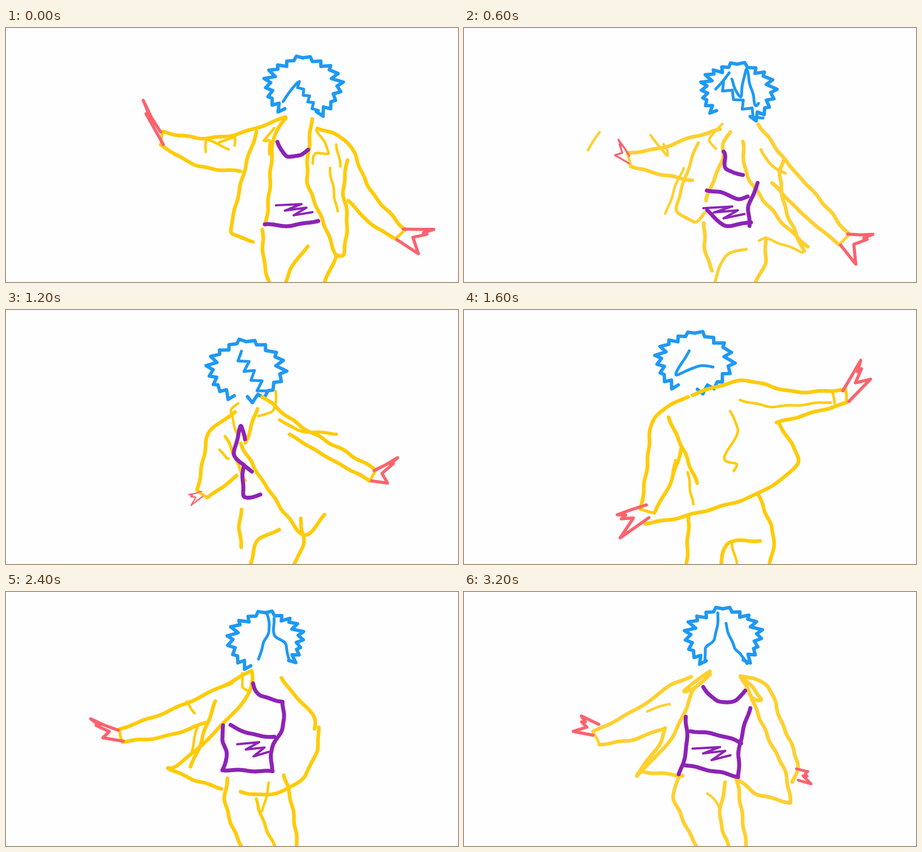
Recreate the animation shown at these times as an HTML page with a canvas. Size 800x450 px, loop 3.3 s.

```html
<!DOCTYPE html>
<html lang="en">
<head>
<meta charset="utf-8">
<title>Dancing line figure</title>
<style>
html, body { margin: 0; width: 100%; height: 100%; overflow: hidden; background: #fefdff; }
canvas { display: block; width: 100%; height: 100%; }
</style>
</head>
<body>
<canvas id="stage" width="800" height="450"></canvas>
<script>
const ctx = document.getElementById('stage').getContext('2d');
const STEP = 100, STEPS = 33, SAMPLES = 60, SPIKES = 9;
const BLUE = '#1e99f4', PURPLE = '#8d23b6', RED = '#fb636d', GOLD = '#fecb07', SOFT = '#fed02f';
const poses = [];

const mix = (a, b, t) => a + (b - a) * t;
const lerp = (p, q, t) => [mix(p[0], q[0], t), mix(p[1], q[1], t)];
const shift = (p, d, k) => [p[0] + d[0] * k, p[1] + d[1] * k];
const unit = ([x, y]) => { const d = Math.hypot(x, y) || 1; return [x / d, y / d]; };
const sub = (p, q) => [p[0] - q[0], p[1] - q[1]];
const pairs = n => n.flatMap((x, i) => i % 2 ? [] : [[x, n[i + 1]]]);

// Smooth curve through a few key points, always with the same number of samples.
function spline(keys) {
  const out = [], last = keys.length - 1;
  for (let s = 0; s <= SAMPLES; s++) {
    const i = Math.min(last - 1, Math.floor(s / SAMPLES * last)), u = s / SAMPLES * last - i;
    const b = keys[i], c = keys[i + 1], a = keys[i - 1] || b, d = keys[i + 2] || c;
    out.push([0, 1].map(k => {
      const m = (c[k] - a[k]) * 0.4, n = (d[k] - b[k]) * 0.4;
      return b[k] + u * (m + u * (3 * (c[k] - b[k]) - 2 * m - n + u * (2 * (b[k] - c[k]) + m + n)));
    }));
  }
  return out;
}

// A pose collects named strokes; strokes of the same name morph into each other.
const add = (name, ink, w, pts) => poses[poses.length - 1].strokes.set(name, { ink, w, pts });
const pen = (ink, w) => (name, ...n) => add(name, ink, w, spline(pairs(n)));
const coat = pen('', 6.5), thin = pen('', 4.5);
const shirt = pen(PURPLE, 7), lock = pen(BLUE, 5);

// Two spiky arcs run from the crown down to the given angles.
function pose(at, x, y, left, right, gold = GOLD) {
  poses.push({ at, x, y, gold, strokes: new Map() });
  const point = (deg, r) => {
    const a = deg * Math.PI / 180;
    return [x + 66 * r * Math.sin(a), y - 54 * r * Math.cos(a)];
  };
  for (const end of [left, right]) {
    const pts = [point(0, 0.95)];
    for (let i = 0; i < SPIKES; i++)
      pts.push(point(end * (i + 0.65) / SPIKES, 1.03 + 0.05 * Math.sin(i * 5)),
        point(end * (i + 0.95) / SPIKES, 0.86 + 0.04 * Math.cos(i * 3)));
    add(end < 0 ? 'hairL' : 'hairR', BLUE, 6, pts);
  }
}

function fringe(x0, y0, x1, y1, amp) {
  const n = unit([y0 - y1, x1 - x0]), pts = [];
  for (let i = 0; i <= 8; i++)
    pts.push(shift(lerp([x0, y0], [x1, y1], i / 8), n, i % 2 ? amp : -amp));
  add('fringe', BLUE, 5, pts);
}

function scribble(x, y, w, h) {
  const pts = [];
  for (let i = 0; i < 6; i++)
    pts.push(i % 2 ? [x + w * (0.62 + 0.075 * i), y + h * (0.225 * i - 0.4)]
      : [x + w * 0.125 * i, y + h * 0.275 * i]);
  add('scribble', PURPLE, 4, pts);
}

// Sleeve from neck over the shoulder to the cuff and back to the armpit; bows bend each edge.
function arm(side, nx, ny, sx, sy, ax, ay, wx, wy, bowTop, bowLow) {
  const shoulder = [sx, sy], pit = [ax, ay], wrist = [wx, wy];
  const axis = unit(sub(wrist, lerp(shoulder, pit, 0.5)));
  let across = [axis[1], -axis[0]];
  if (across[0] * (sx - ax) + across[1] * (sy - ay) < 0) across = [-across[0], -across[1]];
  const edge = (from, to, bow) => {
    const d = unit(sub(to, from));
    return [from, shift(lerp(from, to, 0.5), [-d[1], d[0]], bow), to];
  };
  const a = shift(wrist, across, 12), b = shift(wrist, across, -12);
  add(side + 'Top', '', 6.5, spline([...edge(a, shoulder, bowTop), [nx, ny]]));
  add(side + 'Low', '', 6.5, spline(edge(b, pit, bowLow)));
  add(side + 'Cuff', '', 5, spline([a, b]));
}

// Open outline of a hand: wrist, two fingers, palm, thumb, wrist.
function hand(side, wx, wy, fx, fy, tx, ty) {
  const wrist = [wx, wy], finger = [fx, fy], thumb = [tx, ty];
  const s = unit(sub(finger, thumb));
  add(side + 'Hand', RED, Math.min(5.5, Math.hypot(fx - wx, fy - wy) / 4), [
    shift(wrist, s, 11), shift(lerp(wrist, finger, 0.5), s, 5), finger,
    shift(lerp(wrist, finger, 0.72), s, -3), shift(lerp(wrist, finger, 0.88), s, -8),
    lerp(wrist, lerp(finger, thumb, 0.5), 0.5), thumb, shift(wrist, s, -11)
  ]);
}

pose(0, 526, 105, -146, 157);
arm('l', 496,158, 410,188, 414,254, 276,196, 9, 14);
arm('r', 552,177, 606,204, 606,305, 697,365, -13, -7);
coat('bodyL', 444,183, 425,240, 404,325, 399,362, 436,378);
coat('lapelL', 496,160, 474,195, 466,290, 460,349);
thin('collarL', 475,178, 456,199, 467,201, 466,225);
coat('lapelR', 541,162, 533,268, 556,330, 584,402);
thin('collarR', 550,180, 572,222, 548,222, 543,240);
coat('bodyR', 604,235, 597,290, 604,335, 598,400, 584,402);
thin('fold', 573,247, 586,325);
thin('fold2', 585,206, 592,245);
thin('sleeve', 354,196, 354,220);
thin('sleeve2', 358,198, 393,214);
thin('bump', 378,203, 405,193, 404,208);
coat('legL', 454,357, 456,410, 466,452);
coat('legR', 585,402, 563,452);
coat('inner', 533,386, 505,425, 494,452);
shirt('neck', 481,202, 496,227, 520,226, 534,215);
shirt('hem', 459,348, 505,350, 552,341);
scribble(477, 315, 66, 15);
lock('bangs', 490,131, 516,97);
fringe(516, 97, 550, 148, 4);
hand('l', 276,196, 243,129, 248,152);
hand('r', 697,365, 757,357, 729,399);

pose(4, 515, 115, -115, 143, SOFT);
arm('l', 480,166, 418,168, 390,231, 244,187, 10, 4);
arm('r', 541,180, 600,228, 597,298, 701,360, -3, -5);
coat('bodyL', 418,172, 384,250, 348,352, 396,379, 420,345);
coat('lapelL', 480,182, 465,205, 465,240, 430,320, 425,345);
thin('collarL', 479,167, 449,201, 462,200);
thin('crease', 419,247, 405,280, 388,328);
coat('lapelR', 537,172, 528,235, 578,300, 628,395);
coat('bodyR', 596,233, 590,262, 600,320, 632,393);
thin('hemR', 552,376, 570,373, 629,396);
thin('fold', 557,213, 566,235, 590,256);
thin('cuffL', 271,184, 250,215);
thin('sleeve', 336,188, 323,218);
thin('sleeve2', 360,188, 387,222);
coat('legL', 422,345, 428,415, 444,452);
coat('legR', 541,355, 549,405, 537,452);
thin('inner', 530,402, 485,404, 460,452);
shirt('neck', 475,204, 486,236, 508,241, 522,234);
shirt('sideR', 551,274, 535,315, 536,349);
shirt('hem', 427,347, 480,355, 536,349);
shirt('bust', 460,286, 485,290, 515,301, 532,298);
scribble(454, 317, 74, 17);
lock('bangs', 504,90, 520,120, 530,72, 546,134, 553,133);
lock('lock', 500,78, 476,106);
fringe(474, 107, 560, 166, 5);
hand('l', 244,187, 212,127, 204,174);
hand('r', 701,360, 751,348, 730,398);

pose(9, 438, 118, -165, 180);
arm('l', 411,201, 380,232, 427,328, 364,302, -2, 0);
arm('r', 491,155, 537,263, 466,237, 630,398, 10, -3);
thin('sleeve', 380,232, 405,246, 414,237);
thin('collarL', 425,176, 411,190, 423,235);
thin('bodyL', 408,248, 431,300);
coat('lapelL', 457,185, 443,228, 436,245);
coat('lapelR', 428,247, 465,310, 538,408, 577,374);
thin('collarR', 460,198, 486,190, 491,155);
coat('fold', 480,220, 500,245, 537,261);
coat('legL', 430,345, 426,370, 434,395);
coat('legR', 521,400, 510,428, 484,452);
coat('inner', 452,374, 430,405, 416,452);
shirt('neck', 435,239, 429,217, 417,265, 433,285, 449,298);
shirt('hem', 433,285, 434,341, 464,337);
fringe(424, 88, 470, 158, 8);
hand('l', 364,302, 364,302, 364,302);
hand('r', 630,398, 685,392, 640,447);

pose(16, 408, 93, -150, 175);
arm('l', 397,153, 336,191, 385,245, 325,356, 0, 6);
arm('r', 405,150, 495,125, 552,200, 676,153, -12, 0);
coat('bodyL', 362,191, 383,236, 413,307);
thin('sleeve', 373,266, 369,300);
thin('crease', 396,287, 405,345);
thin('seam', 470,180, 485,212, 461,262, 482,274, 478,286);
thin('cuffR', 653,145, 655,165);
thin('fold', 489,159, 545,171, 648,163);
coat('bodyR', 556,200, 591,270, 515,328, 385,367, 320,378);
coat('legL', 398,366, 394,452);
coat('legR', 521,327, 548,400, 541,452);
coat('inner', 525,409, 468,412, 454,452);
thin('inner2', 474,414, 483,452);
lock('bangs', 398,73, 376,115, 418,98, 440,102);
hand('l', 325,356, 272,362, 277,404);
hand('r', 676,153, 702,90, 720,122);

pose(20, 447, 93, -157, 115);
arm('l', 425,146, 357,206, 349,271, 226,333, 0, 2);
thin('sleeve', 318,228, 292,256);
coat('bodyL', 357,205, 363,320);
thin('crease', 347,268, 325,335);
coat('collarR', 431,174, 446,206, 474,203, 487,167);
thin('hatch', 440,150, 424,170, 437,158, 436,175);
coat('rTop', 487,167, 520,200, 565,255, 596,298);
coat('bodyR', 596,298, 575,293, 505,323, 345,350, 311,346);
coat('legL', 395,343, 397,395, 412,452);
coat('legR', 509,326, 541,452);
thin('inner', 422,360, 440,398, 472,452);
lock('bangs', 458,40, 471,70, 467,85, 455,102);
lock('lock', 474,58, 498,100);
hand('l', 226,333, 165,330, 205,363);
hand('r', 466,160, 436,108, 493,141);

pose(27, 470, 86, -152, 150);
arm('l', 435,139, 365,155, 360,201, 186,195, 6, 12);
thin('sleeve', 320,168, 367,184);
thin('sleeve2', 380,169, 410,158);
coat('bodyL', 382,184, 340,250, 300,302);
thin('crease', 334,214, 328,255);
coat('lapelL', 445,137, 442,172, 405,220, 320,300, 297,308);
thin('collarL', 428,142, 428,165, 440,172);
coat('hemL', 297,308, 330,325, 390,345);
coat('rTop', 490,140, 492,157, 530,193, 507,202);
coat('bodyR', 520,196, 540,275, 553,362, 495,359);
coat('legL', 390,320, 381,360, 395,402, 421,452);
coat('legR', 480,322, 493,375, 497,452);
thin('crotch', 476,335, 464,385);
coat('inner', 457,373, 478,452);
shirt('neck', 447,158, 460,181, 500,191);
shirt('sideR', 500,191, 500,240, 481,270, 480,315);
shirt('sideL', 395,234, 392,260, 401,280, 394,310);
shirt('hem', 393,312, 481,315);
shirt('bust', 408,233, 440,248, 485,254);
scribble(420, 266, 55, 20);
lock('bangs', 466,40, 462,72, 446,95, 442,131);
lock('lock', 473,38, 473,82, 498,98, 503,138);
hand('l', 186,195, 139,147, 146,180);

pose(32, 459, 82, -150, 144, SOFT);
arm('l', 402,150, 366,165, 354,242, 234,259, 5, 6);
thin('sleeve', 325,211, 365,198);
coat('bodyL', 357,240, 345,270, 305,326);
coat('lapelL', 407,172, 370,255, 305,327);
coat('collarL', 435,140, 390,174, 407,172, 435,145);
coat('hemL', 318,319, 388,325);
coat('collarR', 490,148, 510,187, 526,188, 490,148);
coat('rTop', 492,148, 538,167, 560,225, 590,300, 582,336);
coat('bodyR', 510,190, 537,255, 568,318, 578,372);
coat('hemR', 482,328, 515,356, 578,374);
coat('legL', 382,325, 371,365, 412,452);
coat('legR', 483,330, 500,452);
coat('inner', 463,337, 453,398, 468,452);
thin('crotch', 431,357, 452,380, 453,397);
shirt('neck', 424,168, 448,194, 480,192, 497,175);
shirt('sideR', 506,206, 488,270, 486,327);
shirt('sideL', 393,222, 394,275, 381,322);
shirt('hem', 390,306, 486,327);
shirt('bust', 400,246, 455,254, 490,268);
scribble(405, 277, 68, 18);
lock('bangs', 450,38, 444,84, 427,100, 427,125);
lock('lock', 463,55, 478,98, 490,110, 500,126);
hand('l', 234,245, 208,219, 193,247);
hand('r', 590,323, 609,319, 614,340);

// Every step is redrawn by a slightly unsteady hand.
const wobble = ([x, y], seed) =>
  [x + Math.sin(y / 7 + x / 19 + seed), y + Math.sin(x / 8 + y / 23 + seed * 2)];

function trace(pts, w, color, seed) {
  if (w < 0.5) return;
  ctx.strokeStyle = color;
  ctx.lineWidth = w;
  ctx.beginPath();
  pts.forEach(p => ctx.lineTo(...wobble(p, seed)));
  ctx.stroke();
}

function draw(step) {
  const n = poses.findLastIndex(p => p.at <= step);
  const a = poses[n], b = poses[n + 1] || a;
  const t = a === b ? 0 : (step - a.at) / (b.at - a.at);
  const near = t < 0.5 ? a : b;
  const move = [mix(a.x, b.x, t) - near.x, mix(a.y, b.y, t) - near.y];

  ctx.fillStyle = '#fefdff';
  ctx.fillRect(0, 0, 800, 450);
  ctx.lineCap = ctx.lineJoin = 'round';
  for (const [name, s] of near.strokes) {
    const p = a.strokes.get(name), q = b.strokes.get(name);
    const pts = p && q ? p.pts.map((v, i) => lerp(v, q.pts[i], t))
      : s.pts.map(v => shift(v, move, 1));
    trace(pts, p && q ? mix(p.w, q.w, t) : s.w, s.ink || near.gold, step * 2.4);
  }
}

function tick() {
  draw(Math.floor(performance.now() / STEP) % STEPS);
  requestAnimationFrame(tick);
}
tick();
</script>
</body>
</html>
```
